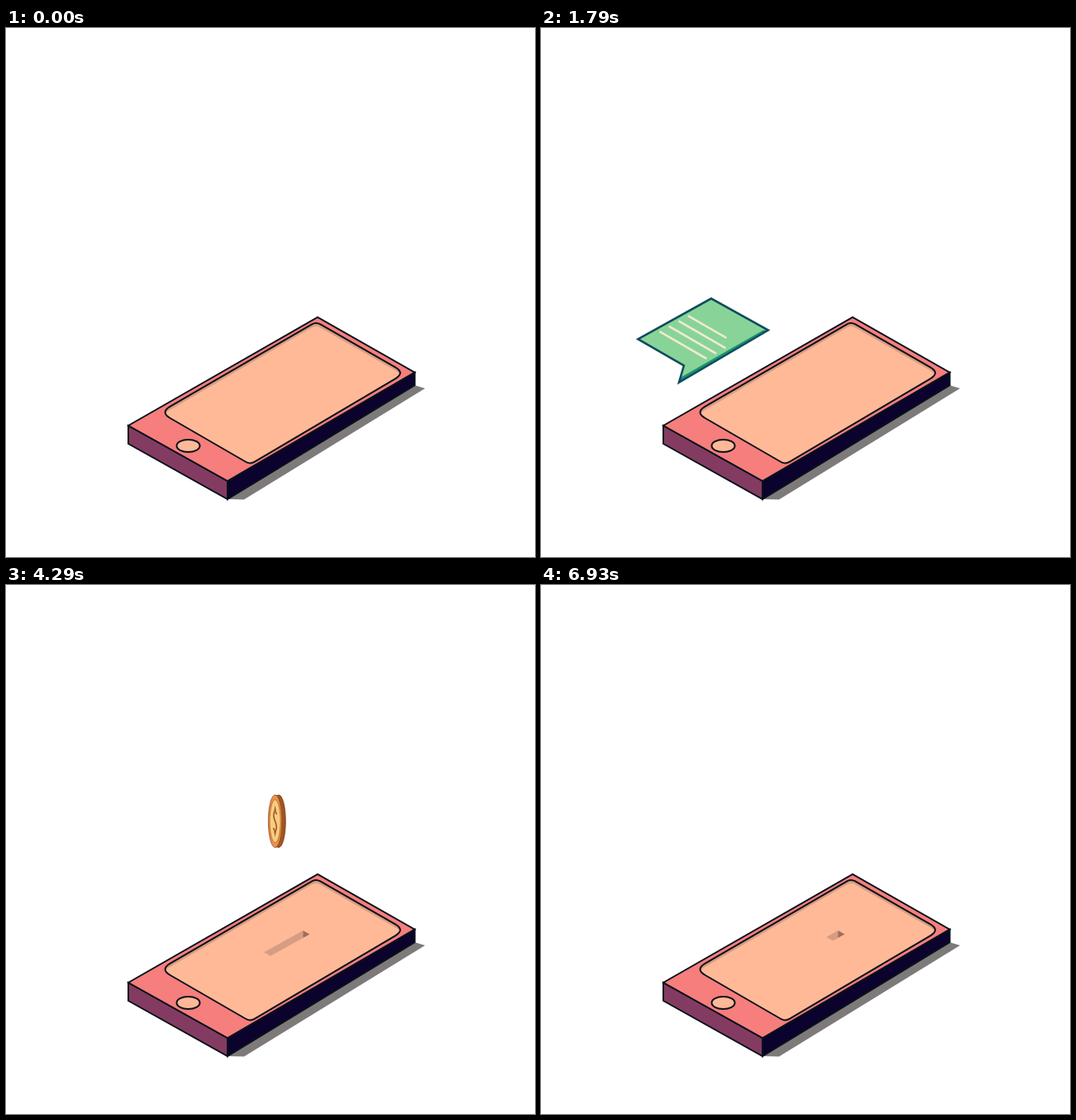
Animation of 640x640 px, one loop 7000 ms. Source, as an HTML page with a canvas:

```html
<!DOCTYPE html>
<html>
<head>
<meta charset="utf-8">
<style>
html, body { margin: 0; width: 100%; height: 100%; overflow: hidden; background: #fff; }
canvas { display: block; width: 640px; height: 640px; }
</style>
</head>
<body>
<canvas id="stage" width="640" height="640"></canvas>
<script>
const ctx = document.getElementById('stage').getContext('2d');
const LOOP = 7000, FPS = 14;
const INK = '#08111a', SCREEN = '#ffb997', SHADE = '#d69d83', COPPER = '#a0561f';
const clamp = v => Math.max(0, Math.min(1, v));
const progress = (tick, start, length) => clamp((tick - start) / length);
const mix = ([ax, ay], [bx, by], k) => [ax + (bx - ax) * k, ay + (by - ay) * k];

// Isometric step: a runs up to the right, b runs down to the right.
const iso = ([x, y], a, b) => [x + a + b, y + (b - a) * 0.555];

function paint(fill, stroke, width = 2) {
  if (fill) { ctx.fillStyle = fill; ctx.fill(); }
  if (stroke) { ctx.strokeStyle = stroke; ctx.lineWidth = width; ctx.stroke(); }
}

function poly(points, fill, stroke, width) {
  ctx.beginPath();
  points.forEach(p => ctx.lineTo(...p));
  ctx.closePath();
  paint(fill, stroke, width);
}

function line(from, to, color, width) {
  ctx.beginPath();
  ctx.moveTo(...from);
  ctx.lineTo(...to);
  paint(null, color, width);
}

function ellipse(x, y, rx, ry, fill, stroke, width) {
  ctx.beginPath();
  ctx.ellipse(x, y, rx, ry, 0, 0, Math.PI * 2);
  paint(fill, stroke, width);
}

// Side corners are rounded wider than the top and bottom ones.
function roundedDiamond(points) {
  ctx.beginPath();
  points.forEach((p, i) => {
    const cut = i % 2 ? 6 : 14;
    const near = q => mix(p, q, cut / Math.hypot(q[0] - p[0], q[1] - p[1]));
    ctx.lineTo(...near(points[(i + 3) % 4]));
    ctx.quadraticCurveTo(...p, ...near(points[(i + 1) % 4]));
  });
  ctx.closePath();
}

function drawBubble(tick) {
  if (tick > 36) return;
  const left = [17.5, 312.5], right = iso(left, 88.5, 69), tip = [67, 365];
  ctx.save();
  ctx.translate((tick - 16) * 11.1, (tick - 16) * 7.1);
  const outline = [left, iso(left, 88.5, 0), right, tip, [73, 344.5]];
  poly(outline, '#88d498');
  poly([right, tip, [69.5, 358.5], iso(right, -3, -3)], '#1a936f');
  poly(outline, null, '#114b5f', 2.5);

  for (let i = 0; i < 4; i++) {
    const start = iso([43.5, 303.3], i * 11.5, 0);
    const written = progress(tick, 4.2 + i * 5.45, 5.45);
    if (written) line(start, mix(start, [start[0] + 57, start[1] + 33], written), '#f3e9d2', 2.5);
  }
  ctx.restore();
}

function drawPhone() {
  const left = [148, 481], top = [377, 350], right = [494.5, 416.7], front = [268, 548];
  const below = ([x, y], depth) => [x, y + depth];
  const foot = below(front, 22), heel = below(right, 15.5);

  poly([foot, [288, 570.5], [507, 436], heel], '#7e7a7a');
  poly([left, front, foot, below(left, 22)], '#843b62', INK);
  poly([front, right, heel, foot], '#0b032d', INK);
  poly([left, top, right, front], '#f67e7d', INK);

  const screen = [[186.5, 465], [375, 355.5], [483, 417.3], [295.5, 528]];
  roundedDiamond(screen);
  paint(SHADE);
  ctx.save();
  ctx.clip();
  ctx.translate(0, 4);
  roundedDiamond(screen);
  paint(SCREEN);
  ctx.restore();
  roundedDiamond(screen);
  paint(null, INK);
  ellipse(220.5, 505.5, 14, 7.5, SCREEN, INK);
}

function drawSlot(tick) {
  const open = progress(tick, 34, 6) * (1 - progress(tick, 94.7, 3.3));
  if (!open) return;
  const near = [359.5, 418], far = iso(near, 0, 8), length = -47.5 * open;
  ctx.save();
  poly([near, far, iso(far, length, 0), iso(near, length, 0)], SHADE);
  ctx.clip();
  poly([near, far, [359.5, 427]], '#a06c62');
  ctx.restore();
}

function drawEmblem(rx, ry) {
  ctx.save();
  ctx.scale(rx, ry);
  ctx.beginPath();
  ctx.moveTo(0.28, -0.32);
  ctx.bezierCurveTo(0, -0.65, -0.55, -0.35, 0, 0);
  ctx.bezierCurveTo(0.55, 0.35, 0, 0.65, -0.28, 0.32);
  ctx.restore();
  paint(null, COPPER, 1.6);
  for (const side of [-ry, ry]) {
    poly([[0, side * 0.76], [rx * 0.2, side * 0.48], [-rx * 0.2, side * 0.48]], COPPER);
  }
}

function drawCoin(tick) {
  if (tick < 50 || tick > 95) return;
  const rise = progress(tick, 50, 10) ** 1.18;
  const fall = progress(tick, 89, 6) ** 2;
  const away = 1 - rise + fall;

  // A slow swing while hovering, with extra turns on the way up and down.
  const swing = 150 * Math.sin((tick - 67.5) * Math.PI / 45);
  const turn = (swing + 125 * (rise - 1 + fall)) * Math.PI / 180;
  const facing = Math.abs(Math.cos(turn));
  const shift = 2.3 * Math.sin(turn) * Math.sign(Math.cos(turn));
  const ry = 29 + 2.5 * rise + 2 * progress(tick, 60, 6) + facing;
  const rx = ry * facing;

  ctx.save();
  // The front lip of the slot hides whatever is below it.
  poly([[0, 0], [640, 0], [640, 280], [367.5, 422.5], [320, 447], [0, 612]]);
  ctx.clip();
  ctx.translate(327.8 + 11 * away, 254 + 171 * (1 - rise) + 193 * fall + ry);
  ellipse(-shift, 0, rx, ry, COPPER, '#713511', 0.8);
  ctx.fillStyle = COPPER;
  ctx.fillRect(-Math.abs(shift), -ry, Math.abs(shift) * 2, ry * 2);
  ctx.translate(shift, 0);
  ellipse(0, 0, rx, ry, '#ec9450', '#914920', 0.8);
  ellipse(0, 0, rx * 0.8, ry * 0.82, '#f8cc80', '#b5652f', 0.9);
  drawEmblem(rx * 0.8, ry * 0.8);
  ctx.restore();
}

function frame() {
  const time = performance.now() % LOOP;
  const tick = Math.min(97, Math.floor((time + 5) * FPS / 1000));
  ctx.fillStyle = '#fff';
  ctx.fillRect(0, 0, 640, 640);
  drawBubble(tick);
  drawPhone();
  drawSlot(tick);
  drawCoin(tick);
  requestAnimationFrame(frame);
}
frame();
</script>
</body>
</html>
```
